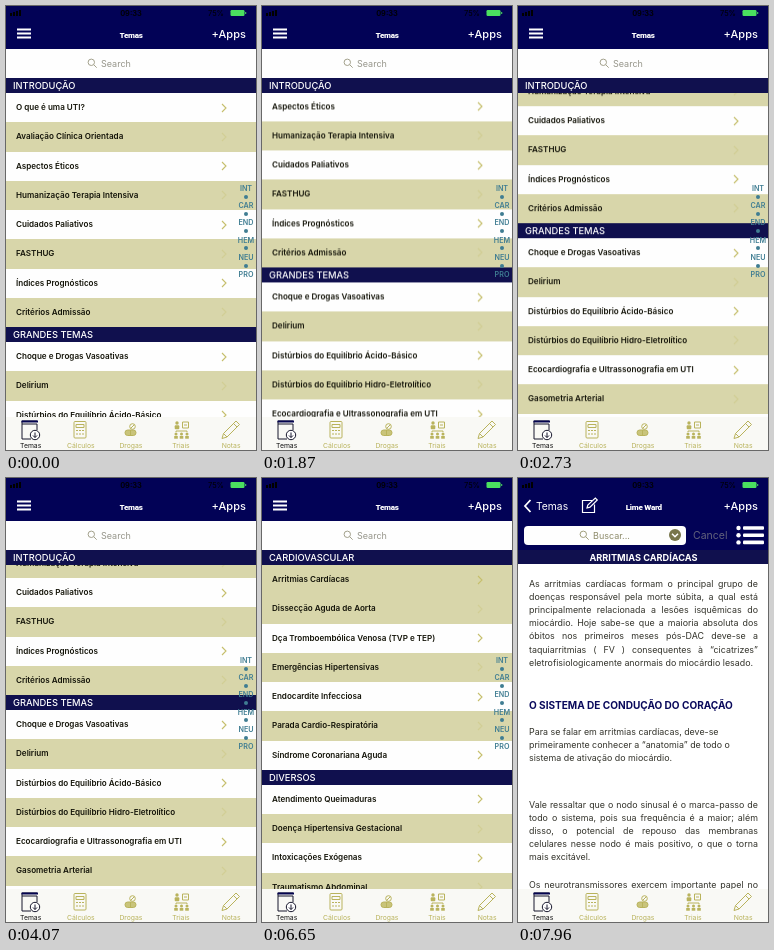
Recreate the animation shown at these times as an HTML page. Size 250 by 444 pixels, loop 8 s.

```html
<!DOCTYPE html>
<html lang="pt">
<head>
<meta charset="utf-8">
<title>Temas</title>
<style>
:root { --navy: #020256; --khaki: #d8d6aa; --gold: #b9b35c; --push: cubic-bezier(.25,.75,.2,1); }
html, body { margin: 0; width: 100%; height: 100%; overflow: hidden; background: #fff; }
#stage { position: relative; width: 250px; height: 444px; overflow: hidden; background: #fff;
  font-family: Inter, "Liberation Sans", sans-serif; color: #15150a; }
#stage div, #stage svg { position: absolute; white-space: nowrap; }
svg { left: 0; top: 0; overflow: visible; fill: none; }
.c { transform: translate(-50%, -50%); }
.l { transform: translateY(-50%); }

/* list screen */
#home { left: 0; top: 43px; width: 250px; height: 368px; overflow: hidden; background: #fefefe;
  animation: under 8s var(--push) infinite; }
#dim { inset: 0; background: #8a8400; opacity: 0; animation: dim 8s var(--push) infinite; }
.view { left: 0; top: 29px; width: 250px; height: 339px; overflow: hidden; }
.list { left: 0; top: 0; width: 250px; }
#first .list { animation: scroll 8s linear infinite; }
#first { animation: hide 8s step-end infinite; }
#second { visibility: hidden; animation: show 8s step-end infinite; }
.head { left: 0; width: 250px; height: 15px; line-height: 15px; background: #10104e;
  color: #fff; font-size: 9.3px; font-weight: 500; text-indent: 7px; }
.row { left: 0; width: 250px; height: 29.25px; line-height: 29px; text-indent: 10px;
  font-size: 8.1px; font-weight: 600; background: #fefefe; }
.row.odd { background: var(--khaki); }
.row svg { left: 216px; top: 10.5px; stroke: #c6bf6c; stroke-width: 1.1; }
.row.odd svg { opacity: .35; }
#second .pick { animation: pick 8s step-end infinite; }
#index { left: 240px; top: 139px; color: #3f7d92; }
#index div { font-size: 7.2px; font-weight: 600; }
#index i { position: absolute; width: 4px; height: 4px; margin: -2px; border-radius: 2px; background: #3f7d92; }

/* article screen */
#page { left: 0; top: 43px; width: 250px; height: 368px; overflow: hidden; background: #fff;
  transform: translateX(250px); animation: slide 8s var(--push) infinite; }
#bar { left: 0; top: 0; width: 250px; height: 29px; background: var(--navy); }
#field { left: 6px; top: 5px; width: 162px; height: 19px; border-radius: 4px; background: #fefefe; }
#text { left: 0; top: 0; visibility: hidden; animation: load 8s step-end infinite; }
.line { left: 11px; font-size: 8.9px; line-height: 13px; color: #33332b; margin-top: -7px; }
.line.full { width: 229px; display: flex; justify-content: space-between; }

/* navigation bar */
#nav { left: 0; top: 0; width: 250px; height: 43px; background: var(--navy); color: #fff; }
.title { top: 28.7px; font: 900 8.1px Roboto, "Liberation Sans", sans-serif; letter-spacing: -.3px; }
#menu { animation: out 8s linear infinite; }
#oldTitle { animation: drift 8s var(--push) infinite, out 8s linear infinite; }
#newTitle { opacity: 0; animation: enter 8s var(--push) infinite, quick 8s linear infinite; }
#back { left: 0; top: 0; opacity: 0; animation: in 8s linear infinite; }
#backText { animation: back 8s var(--push) infinite; }
#edit { opacity: 0; animation: quick 8s linear infinite; }

#tabs { left: 0; top: 411px; width: 250px; height: 33px; background: #f9f9f5; animation: tabs 8s linear infinite; }
#tabs div { top: 27.7px; font-size: 6.8px; color: var(--gold); }
#tabs svg { stroke: var(--gold); stroke-width: 1; }

@keyframes scroll {
  0%, 16.625% { transform: translateY(0); }
  19.625% { transform: translateY(-26px); }
  27.125% { transform: translateY(-93px); animation-timing-function: cubic-bezier(.1,.8,.4,1); }
  36.5%, 100% { transform: translateY(-104px); }
}
@keyframes hide { 0% { visibility: visible; } 58.5%, 100% { visibility: hidden; } }
@keyframes show { 0% { visibility: hidden; } 58.5%, 100% { visibility: visible; } }
@keyframes load { 0% { visibility: hidden; } 94.5%, 100% { visibility: visible; } }
@keyframes pick { 0% { background: #fefefe; } 83.125%, 100% { background: var(--khaki); } }

/* push transition */
@keyframes under { 0%, 89.5% { transform: none; } 95.75%, 100% { transform: translateX(-75px); } }
@keyframes slide { 0%, 89.5% { transform: translateX(250px); } 95.75%, 100% { transform: none; } }
@keyframes dim { 0%, 89.5% { opacity: 0; } 95.75%, 100% { opacity: .18; } }
@keyframes drift { 0%, 89.5% { left: 125px; } 95.75%, 100% { left: 34px; } }
@keyframes enter { 0%, 89.5% { left: 275px; } 95.75%, 100% { left: 125.5px; } }
@keyframes back { 0%, 89.5% { left: 114px; } 95.75%, 100% { left: 18px; } }
@keyframes out { 0%, 89.5% { opacity: 1; } 92.5%, 100% { opacity: 0; } }
@keyframes in { 0%, 89.5% { opacity: 0; } 95.75%, 100% { opacity: 1; } }
@keyframes quick { 0%, 89.5% { opacity: 0; } 91.5%, 100% { opacity: 1; } }
@keyframes tabs {
  0%, 89.5% { background: #f9f9f5; }
  91%, 92.5% { background: #cfcfb0; }
  95%, 100% { background: #f9f9f5; }
}
</style>
</head>
<body>
<div id="stage">
  <div id="home">
    <svg width="1" height="1" stroke="#a3a18c"><circle cx="85.3" cy="13.3" r="3.2"/><path d="M87.7 15.700l3 3"/></svg>
    <div class="l" style="left:95px;top:13.7px;font-size:9px;color:#96958a">Search</div>
    <div class="view" id="first"><div class="list"></div></div>
    <div class="view" id="second"><div class="list"></div></div>
    <div id="index"></div>
    <div id="dim"></div>
  </div>

  <div id="page">
    <div id="text"></div>
    <div id="bar">
      <div id="field"></div>
      <svg width="1" height="1" stroke="#a19f7c">
        <circle cx="65.3" cy="13.3" r="3.2"/><path d="M67.7 15.7l3 3"/>
        <circle cx="157" cy="14" r="6" fill="#77754a" stroke="none"/>
        <path d="M154 12.7l3 3 3-3" stroke="#fff" stroke-width="1.5"/>
        <g fill="#fff" stroke="none">
          <circle cx="220.5" cy="7" r="2.2"/><circle cx="220.5" cy="14.2" r="2.2"/><circle cx="220.5" cy="21.4" r="2.2"/>
          <rect x="225" y="5.2" width="21" height="3.6" rx="1"/><rect x="225" y="12.4" width="21" height="3.6" rx="1"/><rect x="225" y="19.6" width="21" height="3.6" rx="1"/>
        </g>
      </svg>
      <div class="l" style="left:75px;top:13.7px;font-size:9px;color:#8d8b6a">Buscar...</div>
      <div class="l" style="left:175px;top:13.7px;font-size:10.5px;color:#62627c">Cancel</div>
    </div>
  </div>

  <div id="nav">
    <svg width="1" height="1">
      <g fill="#000"><rect x="4" y="7" width="2" height="3"/><rect x="7" y="6" width="2" height="4"/><rect x="10" y="5" width="2" height="5"/><rect x="13" y="4" width="2" height="6"/></g>
      <rect x="224.5" y="4" width="14" height="6" rx="1.2" fill="#4be05f"/><rect x="239.2" y="6" width="1" height="2" fill="#4be05f"/>
    </svg>
    <div class="c" style="left:125px;top:6.5px;font-size:7.5px;font-weight:600;color:#000">09:33</div>
    <div class="l" style="left:202px;top:6.5px;font-size:7.5px;color:#000">75%</div>
    <svg id="menu" width="1" height="1" stroke="#fff" stroke-width="2"><path d="M11 23.500h14M11 27.500h14M11 31.500h14"/></svg>
    <div class="c title" id="oldTitle" style="left:125px">Temas</div>
    <div id="back">
      <svg width="1" height="1" stroke="#fff" stroke-width="1.8"><path d="M12.5 22l-5.5 6 5.5 6"/></svg>
      <div class="l" id="backText" style="left:18px;top:28px;font-size:10.3px">Temas</div>
    </div>
    <svg id="edit" width="1" height="1" stroke="#fff" stroke-width="1.2"><path d="M74 22.5h-9.5v12h12v-8M69 30l.8-3 7.5-7 2 2-7.3 7.2z"/></svg>
    <div class="c title" id="newTitle">Lime Ward</div>
    <div class="l" style="left:205.6px;top:28px;font-size:11px;font-weight:500">+Apps</div>
  </div>

  <div id="tabs">
    <svg width="1" height="1">
      <g stroke="#17172c">
        <path d="M31 13V7H16v15h9M16 7V4h15"/><path d="M15.5 4.5H32" stroke="#04044f" stroke-width="2"/>
        <circle cx="29" cy="18" r="4.7" fill="#fff"/><path d="M29 15.500v5M27 18.500l2 2 2-2"/>
      </g>
      <rect x="68" y="4.5" width="12" height="16.5" rx="1"/><path d="M70 7.5h8v3h-8zM70 13.5h2M73 13.5h2M76 13.5h2M70 17h2M73 17h2M76 17h2"/>
      <rect x="119" y="13" width="11" height="5.5" rx="2.700" fill="#c9c47a"/><circle cx="126.5" cy="9.5" r="2.800"/><path d="M124.500 13v5.500M124.700 11.300l3.600-3.600"/>
      <g fill="#b9b35c" stroke="none">
        <circle cx="171" cy="6" r="1.7"/><rect x="168.700" y="8.300" width="4.600" height="4" rx="1"/>
        <circle cx="170" cy="17" r="1.500"/><circle cx="175.500" cy="17" r="1.500"/><circle cx="181" cy="17" r="1.500"/>
        <rect x="168.200" y="19" width="3.600" height="2.700"/><rect x="173.700" y="19" width="3.600" height="2.700"/><rect x="179.200" y="19" width="3.600" height="2.700"/>
      </g>
      <path d="M176.500 5h6v6h-6zM178 8h3M170 15v-1h11v1"/>
      <path d="M216 21.500l1.500-5L230 4l3.500 3.500L221 20zM217.500 16.500l3.500 3.500M227.500 6.500l3.500 3.500"/>
    </svg>
  </div>
</div>

<script>
const $ = s => document.querySelector(s);
const ROW = 29.25, HEAD = 15;

function add(parent, cls, text, style) {
  const el = document.createElement('div');
  el.className = cls;
  el.textContent = text;
  Object.assign(el.style, style);
  parent.append(el);
  return el;
}

function fillList(view, sections) {
  const list = view.querySelector('.list');
  let y = 0;
  for (const [name, ...rows] of sections) {
    add(list, 'head', name, { top: y + 'px' });
    y += HEAD;
    rows.forEach((text, i) => {
      const row = add(list, 'row' + (i % 2 ? ' odd' : ''), text, { top: y + 'px' });
      row.insertAdjacentHTML('beforeend', '<svg width="5" height="8"><path d="M0 0l4 4-4 4"/></svg>');
      y += ROW;
    });
  }
  // pinned section title
  add(view, 'head', sections[0][0], { top: 0 });
}

fillList($('#first'), [
  ['INTRODUÇÃO', 'O que é uma UTI?', 'Avaliação Clínica Orientada', 'Aspectos Éticos',
    'Humanização Terapia Intensiva', 'Cuidados Paliativos', 'FASTHUG', 'Índices Prognósticos', 'Critérios Admissão'],
  ['GRANDES TEMAS', 'Choque e Drogas Vasoativas', 'Delirium', 'Distúrbios do Equilíbrio Ácido-Básico',
    'Distúrbios do Equilíbrio Hidro-Eletrolítico', 'Ecocardiografia e Ultrassonografia em UTI', 'Gasometria Arterial']
]);
fillList($('#second'), [
  ['CARDIOVASCULAR', 'Arritmias Cardíacas', 'Dissecção Aguda de Aorta', 'Dça Tromboembólica Venosa (TVP e TEP)',
    'Emergências Hipertensivas', 'Endocardite Infecciosa', 'Parada Cardio-Respiratória', 'Síndrome Coronariana Aguda'],
  ['DIVERSOS', 'Atendimento Queimaduras', 'Doença Hipertensiva Gestacional', 'Intoxicações Exógenas', 'Traumatismo Abdominal']
]);
$('#second .row').classList.add('pick');

['INT', 'CAR', 'END', 'HEM', 'NEU', 'PRO'].forEach((t, i) => {
  const y = i * 17.2;
  add($('#index'), 'c', t, { top: y + 'px' });
  if (i < 5) $('#index').insertAdjacentHTML('beforeend', `<i style="top:${y + 8.7}px"></i>`);
});

['Temas', 'Cálculos', 'Drogas', 'Triais', 'Notas'].forEach((t, i) =>
  add($('#tabs'), 'c', t, { left: 24.7 + i * 50.1 + 'px', ...(i ? {} : { color: '#111' }) }));

const article = $('#text');
function lines(y, full, texts) {
  texts.forEach((t, i) => {
    const just = i < full;
    const el = add(article, 'line' + (just ? ' full' : ''), just ? '' : t, { top: y - 43 + i * 13.1 + 'px' });
    if (just) t.split(' ').forEach(w => el.append(Object.assign(document.createElement('span'), { textContent: w })));
  });
}
add(article, 'head', '', { top: '29px', height: '14px' });
add(article, 'c', 'ARRITMIAS CARDÍACAS', { left: '125.5px', top: '35.5px', color: '#fff', fontSize: '9.2px', fontWeight: 700 });
lines(106, 6, [
  'As arritmias cardíacas formam o principal grupo de',
  'doenças responsável pela morte súbita, a qual está',
  'principalmente relacionada a lesões isquêmicas do',
  'miocárdio. Hoje sabe-se que a maioria absoluta dos',
  'óbitos nos primeiros meses pós-DAC deve-se a',
  'taquiarritmias ( FV ) consequentes à “cicatrizes”',
  'eletrofisiologicamente anormais do miocárdio lesado.'
]);
add(article, 'l', 'O SISTEMA DE CONDUÇÃO DO CORAÇÃO',
  { left: '11px', top: '183.5px', color: '#0a0a5c', fontSize: '10.05px', fontWeight: 700 });
lines(253.5, 0, [
  'Para se falar em arritmias cardíacas, deve-se',
  'primeiramente conhecer a “anatomia” de todo o',
  'sistema de ativação do miocárdio.'
]);
lines(327, 4, [
  'Vale ressaltar que o nodo sinusal é o marca-passo de',
  'todo o sistema, pois sua frequência é a maior; além',
  'disso, o potencial de repouso das membranas',
  'celulares nesse nodo é mais positivo, o que o torna',
  'mais excitável.'
]);
lines(406.5, 1, ['Os neurotransmissores exercem importante papel no']);
</script>
</body>
</html>
```
